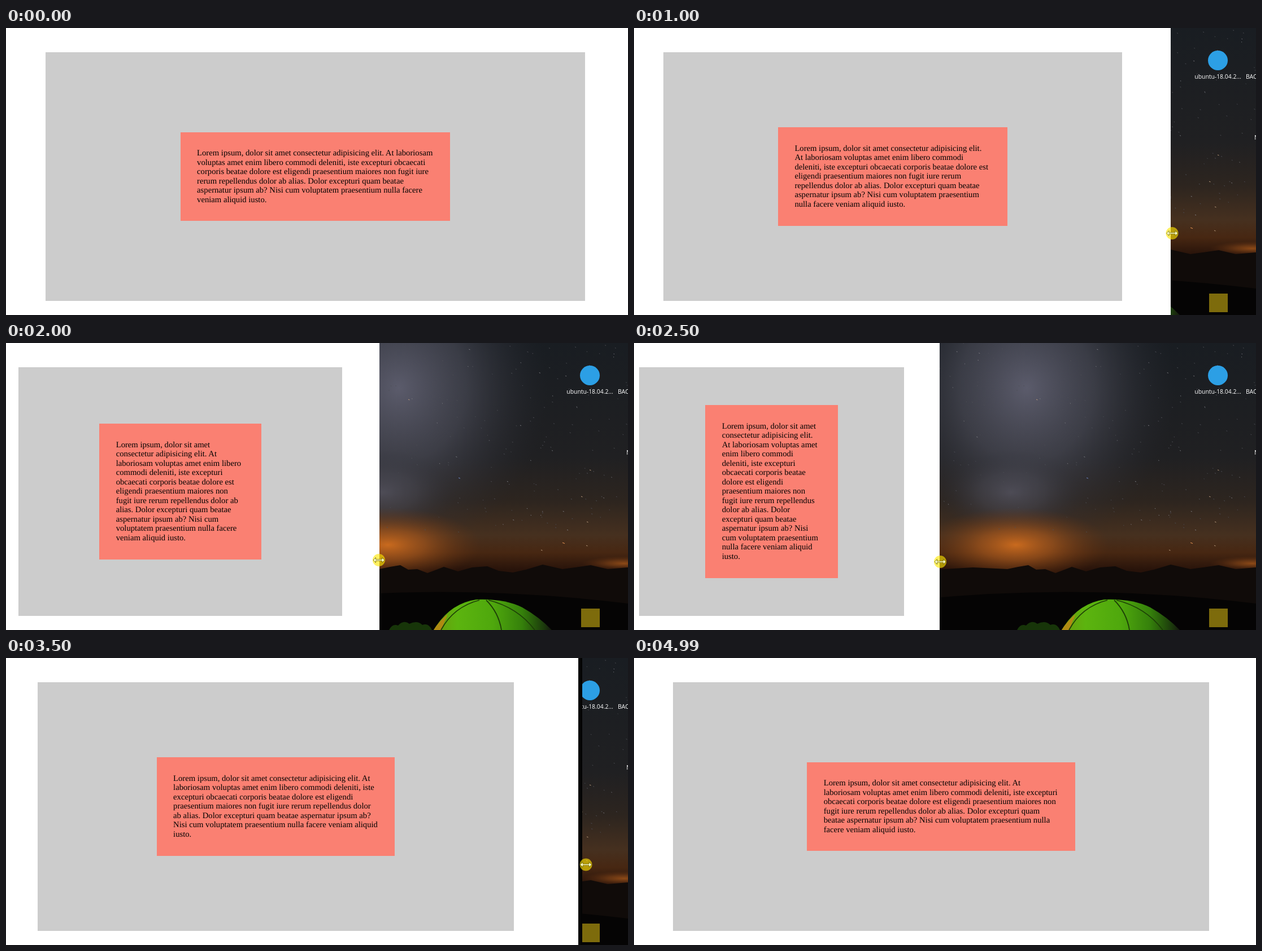
Animation of 1101 by 509 pixels, one loop 5.99 s. Source, as an HTML page:

```html
<!DOCTYPE html>
<html lang="en">
<head>
<meta charset="utf-8">
<title>Responsive centred box</title>
<style>
html, body { margin: 0; width: 100%; height: 100%; overflow: hidden; background: #fff; }

/* --view: viewport width, --edge: right side of the page,
   --bar: black strip beside it, --cx/--cy: pointer */
#stage {
  position: relative; width: 1101px; height: 509px; overflow: hidden;
  animation: resize 5990ms step-end infinite;
}
#stage > * { position: absolute; }

#desktop { left: 0; top: 0; }
#desktop text { font: 10.4px "Open Sans", "Noto Sans", sans-serif; fill: #fff; }

#strip { left: var(--edge); top: 0; width: var(--bar); height: 100%; background: #030303; }
#page { left: 0; top: 0; width: var(--edge); height: 100%; background: #fff; }

#outer {
  left: calc(var(--view) * .1 - 49.4px); top: 43px;
  width: calc(var(--view) * .8); height: 441px;
  display: flex; align-items: center; justify-content: center;
  background: #ccc;
}
#inner {
  box-sizing: border-box; width: 50%; margin: 0;
  padding: 29.3px 28.8px 29.3px 29.3px;
  background: #fa8072; color: #000;
  font: 14.667px/16.5px "Liberation Serif", "Times New Roman", serif;
  text-rendering: geometricPrecision;
}

#pointer { left: -12px; top: -12px; transform: translate(var(--cx), var(--cy)); }

@keyframes resize {
  0%      { --view: 1194px; --edge: 1101px; --bar: 0px;  --cx: 1140px;   --cy: 350px; }
  8.347%  { --view: 1144px; --edge: 1083px; --bar: 0px;  --cx: 1084px;   --cy: 354px; }
  16.694% { --view: 1015px; --edge: 950px;  --bar: 0px;  --cx: 952.5px;  --cy: 364px; }
  25.041% { --view: 874px;  --edge: 822px;  --bar: 0px;  --cx: 823.5px;  --cy: 375px; }
  33.388% { --view: 716px;  --edge: 661px;  --bar: 0px;  --cx: 660px;    --cy: 385px; }
  41.736% { --view: 586px;  --edge: 541px;  --bar: 0px;  --cx: 542px;    --cy: 388px; }
  49.749% { --view: 768px;  --edge: 747px;  --bar: 15px; --cx: 770.5px;  --cy: 377px; }
  58.430% { --view: 1054px; --edge: 1013px; --bar: 7px;  --cx: 1026.5px; --cy: 366.5px; }
  66.777% { --view: 1154px; --edge: 1101px; --bar: 0px;  --cx: 1111px;   --cy: 368px; }
  74.958% { --view: 1184px; --edge: 1101px; --bar: 0px;  --cx: 1140px;   --cy: 368px; }
  83.305%, 100% { --view: 1186px; --edge: 1101px; --bar: 0px; --cx: 1140px; --cy: 368px; }
}
</style>
</head>
<body>
<div id="stage">
  <svg id="desktop" width="1101" height="509" viewBox="0 0 1101 509">
    <defs>
      <linearGradient id="sky" x2="0" y2="1">
        <stop offset="0" stop-color="#191d22"/>
        <stop offset=".4" stop-color="#202022"/>
        <stop offset=".55" stop-color="#2d251f"/>
        <stop offset=".67" stop-color="#46301f"/>
        <stop offset=".73" stop-color="#472712"/>
        <stop offset=".79" stop-color="#28130a"/>
      </linearGradient>
      <radialGradient id="haze">
        <stop offset="0" stop-color="#666678" stop-opacity=".85"/>
        <stop offset=".45" stop-color="#50515e" stop-opacity=".6"/>
        <stop offset="1" stop-color="#2a2c34" stop-opacity="0"/>
      </radialGradient>
      <radialGradient id="glow">
        <stop offset="0" stop-color="#c96a1e"/>
        <stop offset=".4" stop-color="#a4561c" stop-opacity=".7"/>
        <stop offset="1" stop-color="#6a3513" stop-opacity="0"/>
      </radialGradient>
      <linearGradient id="tent" x2="1">
        <stop offset="0" stop-color="#6a9a0c"/>
        <stop offset=".2" stop-color="#5cb40f"/>
        <stop offset=".5" stop-color="#4fa80d"/>
        <stop offset=".75" stop-color="#35800b"/>
        <stop offset=".93" stop-color="#1c3b0c"/>
        <stop offset="1" stop-color="#15170f"/>
      </linearGradient>
    </defs>
    <rect width="1101" height="509" fill="url(#sky)"/>
    <ellipse cx="695" cy="80" rx="265" ry="290" fill="url(#haze)"/>
    <ellipse cx="668" cy="265" rx="130" ry="75" fill="url(#haze)" opacity=".6"/>
    <ellipse cx="676" cy="358" rx="165" ry="66" fill="url(#glow)"/>
    <ellipse cx="1094" cy="391" rx="75" ry="13" fill="url(#glow)" opacity=".6"/>
    <g id="stars"></g>
    <path fill="#100b09" d="M500 509V404L600 398 661 401 680 397 698 394 712 402 728 401 746 408 775 397 800 405 825 398 852 396 872 404 897 407 920 402 950 393 985 401 1035 394 1065 401 1101 398V509Z"/>
    <path fill="#050404" d="M500 509V455Q800 425 1101 462V509Z"/>
    <path fill="#173509" d="M678 509Q684 497 694 501 704 490 714 498 728 491 737 500 748 496 754 509Z"/>
    <path fill="url(#tent)" d="M757 509Q785 462 832 455 882 453 914 469 944 486 966 509Z"/>
    <path fill="#b08a12" d="M757 509Q767 493 782 481 775 495 771 509Z"/>
    <g fill="none" stroke="#1d3f07" stroke-width="1.8">
      <path d="M770 509Q792 468 838 456M850 456Q872 478 877 509M854 456Q906 469 936 509"/>
    </g>
    <circle cx="1033.5" cy="57.5" r="17.5" fill="#2c9fe5"/>
    <text x="1033.5" y="90" text-anchor="middle">ubuntu-18.04.2...</text>
    <text x="1083" y="90">BAC</text>
    <text x="1098" y="198">N</text>
    <rect x="1018" y="471" width="33" height="33" fill="#7d6b0c"/>
  </svg>
  <div id="strip"></div>
  <div id="page"></div>
  <div id="outer">
    <p id="inner">Lorem ipsum, dolor sit amet consectetur adipisicing elit. At laboriosam voluptas amet enim libero commodi deleniti, iste excepturi obcaecati corporis beatae dolore est eligendi praesentium maiores non fugit iure rerum repellendus dolor ab alias. Dolor excepturi quam beatae aspernatur ipsum ab? Nisi cum voluptatem praesentium nulla facere veniam aliquid iusto.</p>
  </div>
  <svg id="pointer" width="24" height="24" viewBox="-12 -12 24 24">
    <circle r="11" fill="#ffe600" fill-opacity=".62"/>
    <path d="M-10 0L-5.5-4.5V-1.2H5.5V-4.5L10 0 5.5 4.5V1.2H-5.5V4.5Z" fill="#ffffc4" stroke="#6b6200" stroke-width=".8"/>
  </svg>
</div>
<script>
const stars = document.getElementById("stars");

function star(x, y, color, length) {
  const line = document.createElementNS("http://www.w3.org/2000/svg", "path");
  line.setAttribute("d", `M${x} ${y}l${length} ${length * .4}`);
  line.setAttribute("stroke", color);
  stars.append(line);
}

let seed = 7;
const random = () => (seed = seed * 16807 % 2147483647) / 2147483647;
for (let i = 0; i < 190; i++) {
  star(540 + random() * 561, random() * 340, random() < .2 ? "#808086" : "#4e4f56", 1 + random());
}

// the brighter stars
const bright = [[1033, 225], [1018, 272], [1028, 317], [1027, 359], [947, 367], [712, 100]];
for (const [x, y] of bright) star(x, y, "#b99a7c", 2.5);
star(801, 239, "#7088c8", 3);
star(985, 354, "#ee9a55", 4);
</script>
</body>
</html>
```
